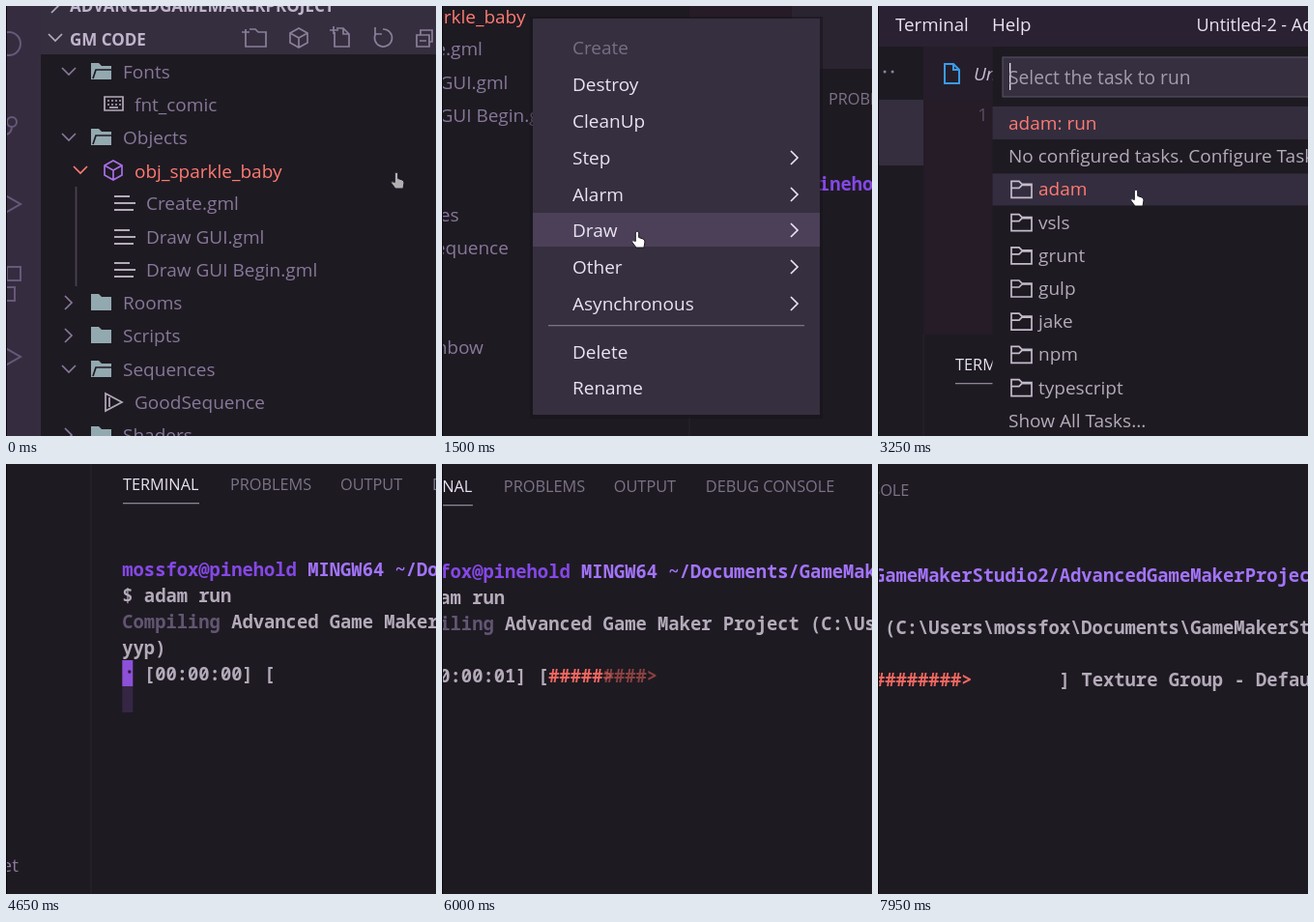
An HTML page for the animation above (8 s loop, 445x445 px).

```html
<!DOCTYPE html>
<html lang="en">
<head>
<meta charset="utf-8">
<title>Editor tour</title>
<style>
  html, body { margin: 0; width: 100%; height: 100%; overflow: hidden; background: #1e1a22; }
  svg { display: block; width: 100vw; height: 100vh; }
  text { font: 19px "Open Sans", "Noto Sans", sans-serif; white-space: pre; }
  .head { font-size: 17px; font-weight: 700; }
  .tab { font-size: 16.3px; }
  .bar { font-size: 18.7px; }
  .title { font-size: 18px; }
  .file { font-style: italic; }
  .mono { font: 600 18.82px "Noto Sans Mono", "DejaVu Sans Mono", monospace; }
  .line { fill: none; stroke-width: 1.7; }
</style>
</head>
<body>
<svg id="stage" viewBox="0 0 445 445"></svg>
<script>
const LOOP = 8000;
const COL = 11.29;
const TERM_X = 487.3;
const TERM_Y = 350.5;
const C = {
  bg: '#1e1a22', raised: '#352e3f', tree: '#87789a', coral: '#ff7b72', folder: '#93a9b0',
  icon: '#8b7f99', dim: '#66597a', pale: '#b4abba', text: '#eae3f2', violet: '#8548e6', lilac: '#a374fa'
};

const rect = (x, y, w, h, fill, extra = '') =>
  `<rect x="${x}" y="${y}" width="${w}" height="${h}" fill="${fill}" ${extra}/>`;
const label = (x, y, s, fill, extra = '') =>
  `<text x="${x}" y="${y + 7}" fill="${fill}" ${extra}>${s}</text>`;
const line = (d, stroke, extra = '') => `<path class="line" d="${d}" stroke="${stroke}" ${extra}/>`;
const mono = (col, row, s, fill, extra = '') =>
  `<text class="mono" x="${TERM_X + col * COL}" y="${TERM_Y + row * 27}" fill="${fill}" ${extra}>${s}</text>`;

const chevron = (x, y, open, color) =>
  line(open ? `M${x - 7} ${y - 4}l7 7 7-7` : `M${x - 4} ${y - 7}l7 7-7 7`, color);
const cube = (x, y, color) =>
  line(`M${x} ${y - 10}l9 5v10l-9 5-9-5v-10zM${x - 9} ${y - 5}l9 5 9-5M${x} ${y}v10`, color);

function folderIcon(y, open) {
  const body = `<path d="M88 ${y - 9}h8l3 3h10v14h-21z" fill="${C.folder}"/>`;
  return body + (open ? line(`M90 ${y + 7}l3-9h17`, C.bg) : '');
}

function folder(y, name, open) {
  return chevron(65, y, open, C.tree) + folderIcon(y, open) + label(121, y, name, C.tree);
}

function script(y, name) {
  return line(`M112 ${y - 7}h16M112 ${y}h22M112 ${y + 7}h20`, C.pale, 'style="stroke-width:2"')
    + label(145, y, name, C.tree);
}

function keyboard(y) {
  return line(`M102 ${y - 8}h19v14h-19z`, C.pale)
    + line(`M105 ${y - 4}h14M105 ${y}h14`, C.pale, 'stroke-dasharray="2 2"')
    + line(`M107 ${y + 3}h9`, C.pale);
}

function headerActions() {
  return '<g id="actions">'
    + line('M252 24h6l3 3h9M248 32v10h21v-15M248 24v8M244 27h8', C.icon) + cube(303, 33, C.icon)
    + line('M340 27v15h15v-13l-6-6h-7M335 25h9M339 21v8M349 23v6h6', C.icon)
    + line('M383 28a9 9 0 1 0 7-4M382 22v7h7', C.icon)
    + line('M425 30h13v12h-13zM429 30v-5h12v12h-3M428 36h7', C.icon) + '</g>';
}

function sidebar() {
  return rect(0, -73, 36, 1000, '#352d3f')
    + `<g class="line" stroke="${C.dim}" style="stroke-width:2">
        <circle cx="3" cy="39" r="12"/><circle cx="6" cy="120" r="5"/>
        <path d="M6 125q0 8-10 9M-6 193L15 205-6 217zM1 270h14v14h-14zM-6 291h15v14h-15zM-6 351L15 363-6 375z"/></g>`
    + '<circle cx="415" cy="-47" r="1.5" fill="#8d8497"/><circle cx="423" cy="-47" r="1.5" fill="#8d8497"/>'
    + rect(36, -18, 419, 68, C.raised)
    + chevron(51, 0, false, C.pale) + label(66, -1, 'ADVANCEDGAMEMAKERPROJECT', '#c0b4cc', 'class="head"')
    + chevron(51, 33, true, C.pale) + label(66, 34, 'GM CODE', '#c0b4cc', 'class="head"')
    + headerActions()
    + folder(68, 'Fonts', true) + keyboard(102) + label(133, 102, 'fnt_comic', C.tree)
    + folder(136, 'Objects', true)
    + chevron(77, 170, true, C.coral) + cube(111, 170, '#a970e8') + label(133, 171, 'obj_sparkle_baby', C.coral)
    + line('M72.5 187V290', '#4a4255')
    + script(204, 'Create.gml') + script(239, 'Draw GUI.gml') + script(273, 'Draw GUI Begin.gml')
    + folder(307, 'Rooms') + folder(341, 'Scripts') + folder(376, 'Sequences', true)
    + line('M103 401l17 9-17 9zM107 405v10', C.pale) + label(133, 410, 'GoodSequence', C.tree)
    + folder(444, 'Shaders') + folder(478, 'Sprites', true) + label(133, 513, 'spr_rainbow', C.tree)
    + folder(547, 'Sounds') + folder(581, 'Paths') + folder(616, 'Tile Sets', true)
    + label(380, 650, 'til_sparkle_rainbow_set', C.tree, 'text-anchor="end"');
}

function editor() {
  return rect(455, -73, 1200, 55, '#251e2a') + rect(455, -18, 1200, 243, '#251c27')
    + rect(561, -18, 1100, 243, '#2a2330')
    + rect(0, -130, 1700, 57, '#2a2232')
    + label(426, -96, 'Terminal', C.text, 'class="bar"') + label(526, -96, 'Help', C.text, 'class="bar"')
    + label(737.5, -96, 'Untitled-2 - AdvancedGameMakerProject', C.text, 'class="title"')
    + line('M477-55h9l6 6v14h-15zM486-55v6h6', '#3b9be8', 'style="stroke-width:2"')
    + label(507, -45, 'Untitled-2', '#c7bcd3', 'class="file"')
    + label(511, -3, '1', '#574d63');
}

function panel() {
  const tabs = [[599, 'PROBLEMS'], [713, 'OUTPUT'], [808, 'DEBUG CONSOLE']];
  const path = 'C:\\Users\\mossfox\\Documents\\GameMakerStudio2\\AdvancedGameMakerProject';
  return line('M455 225V900', '#25202a')
    + label(488, 254.5, 'TERMINAL', C.text, 'class="tab"') + rect(488, 275, 79, 1.3, '#8d8497')
    + tabs.map(([x, s]) => label(x, 254.5, s, '#7d7388', 'class="tab"')).join('')
    + mono(0, 0, 'mossfox@pinehold', C.violet)
    + mono(17, 0, 'MINGW64 ~/Documents/GameMakerStudio2/AdvancedGameMakerProject', C.lilac)
    + mono(0, 1, '$', C.pale) + mono(2, 1, '', C.pale, 'id="command"')
    + '<g id="output">' + mono(0, 2, 'Compiling', '#625572')
    + mono(10, 2, `Advanced Game Maker Project (${path}`, C.pale) + mono(0, 3, 'yyp)', C.pale)
    + rect(TERM_X, 438, 11, 27, '#8d50d8') + rect(TERM_X, 465, 11, 27, '#352744')
    + '<circle id="spinner" r="1.7" fill="#2c1b40"/>'
    + mono(2, 4, '', C.pale, 'id="clock"') + mono(13, 4, '[', C.pale)
    + mono(14, 4, '', '#f2675f', 'id="done"') + mono(14, 4, '', '#f2675f', 'id="leaving"')
    + mono(14, 4, '', '#f2675f', 'id="coming"')
    + mono(54, 4, ']', C.pale) + mono(56, 4, '', C.pale, 'id="message"') + '</g>';
}

const menuItems = [
  ['Create', 203], ['Destroy', 241], ['CleanUp', 279], ['Step', 317, 1], ['Alarm', 355, 1],
  ['Draw', 392, 1], ['Other', 430, 1], ['Asynchronous', 468, 1], ['Delete', 518], ['Rename', 555]
];
function menu() {
  return '<g id="menu">' + rect(290, 171, 303, 416, '#17131b', 'opacity=".5"')
    + rect(293, 173, 297, 410, '#362f3f') + rect(293, 0, 297, 35, '#4b4058', 'id="hover"')
    + menuItems.map(([s, y, sub], i) => label(334, y, s, i ? C.text : '#776f84')
      + (sub ? line(`M560 ${y - 7}l7 7-7 7`, C.text) : '')).join('')
    + rect(309, 490, 265, 1.3, '#7b7287') + '</g>';
}

const tasks = ['adam: run', 'No configured tasks. Configure Tasks...', 'adam', 'vsls', 'grunt', 'gulp',
  'jake', 'npm', 'typescript', 'Show All Tasks...'];
const taskY = i => 6 + i * 34.2;
function palette() {
  const row = (s, i) => {
    const y = taskY(i), plain = i < 2 || i === 9;
    const icon = line(`M546 ${y - 8}h8l3 3h10v14h-21zM546 ${y - 1}h8l3-3h10`, '#c4bbcb');
    return (plain ? '' : icon)
      + label(plain ? 543 : 574, y, s, i ? C.pale : C.coral, 'class="task"');
  };
  return '<g id="palette">' + rect(526.5, -73, 900, 414, C.bg)
    + rect(537, -62, 880, 41, '#352f3f', 'stroke="#5d5468"')
    + rect(544, -56, 1.3, 28, C.text)
    + label(543, -41.5, 'Select the task to run', '#a59cae', 'style="font-size:19.2px"')
    + rect(526.5, -11, 900, 34, '#342d3e') + rect(526.5, 0, 900, 33, '#342d3f', 'id="taskHover"')
    + tasks.map(row).join('') + '</g>';
}

const hand = `<path id="hand" d="M-1.7 0Q0-2 1.7 0V5.5L6 7Q8 7.5 8 10L7 16H-1L-5.5 10Q-4.5 7.5-1.7 9.5Z"
  fill="#fff" stroke="#1b1720" stroke-width="1"/>`;

document.getElementById('stage').innerHTML =
  '<g id="world">' + sidebar() + editor() + panel() + menu() + palette() + hand + '</g>' + rect(0, 0, 1, 445, '#09070b');

const el = Object.fromEntries([...document.querySelectorAll('[id]')].map(n => [n.id, n]));
const taskLabels = [...document.querySelectorAll('.task')];

// Monotone cubic through [time, x, y] keys.
function along(keys, t) {
  let i = 0;
  while (i < keys.length - 2 && t >= keys[i + 1][0]) i++;
  const a = keys[i], b = keys[i + 1], span = b[0] - a[0];
  const u = Math.max(0, Math.min(1, (t - a[0]) / span));
  const rate = (k, n) => (keys[k + 1][n] - keys[k][n]) / (keys[k + 1][0] - keys[k][0]);
  const slope = (k, n) => {
    if (k === 0 || k === keys.length - 1) return 0;
    const p = rate(k - 1, n), q = rate(k, n);
    return p * q <= 0 ? 0 : 2 * p * q / (p + q);
  };
  return [1, 2].map(n => {
    const ease = u * u * (3 - 2 * u);
    return a[n] + (b[n] - a[n]) * ease
      + span * u * (1 - u) * ((1 - u) * slope(i, n) - u * slope(i + 1, n));
  });
}

const camera = [
  [0, 0, 0], [1500, 199, 160], [1900, 203, 160], [2850, 408, -115], [3350, 408, -115], [3351, 366, 235],
  [4300, 366, 235], [4650, 367, 235], [6000, 535, 233], [6950, 745, 231], [7950, 909, 229], [9000, 1000, 228]
];
const pointer = [
  [0, 404, 173], [500, 293, 173], [650, 293, 173], [1500, 401, 394], [1900, 401, 394],
  [2500, 464, -95], [2700, 464, -95], [3250, 675, 76], [3400, 675, 76]
];
const progress = [
  [0, 0], [5400, 2], [5700, 5], [5950, 9], [6150, 12], [6350, 15], [6550, 19], [6800, 24], [7250, 27], [7600, 31]
];

const show = (node, on) => node.setAttribute('visibility', on ? 'visible' : 'hidden');
const barText = n => n ? '#'.repeat(n) + '&gt;' : '';

function drawBar(t) {
  let i = progress.length - 1;
  while (i && t < progress[i][0]) i--;
  const now = progress[i][1], before = i ? progress[i - 1][1] : 0;
  const k = i ? Math.min(1, (t - progress[i][0]) / 100) : 1;
  const place = (node, col, s, alpha) => {
    node.setAttribute('x', TERM_X + (14 + col) * COL);
    node.innerHTML = s;
    node.setAttribute('opacity', alpha);
  };
  place(el.done, 0, '#'.repeat(before), 1);
  place(el.leaving, before, before ? '&gt;' : '', 1 - k);
  place(el.coming, before, barText(now).slice(before), k);
}

function draw(t) {
  const [cx, cy] = along(camera, t);
  const [px, py] = along(pointer, t);
  el.world.setAttribute('transform', `translate(${-cx} ${-cy})`);
  el.hand.setAttribute('transform', `translate(${px} ${py})`);
  el.hand.setAttribute('opacity', Math.min(1, 0.65 + t / 600));
  show(el.hand, t < 3350);
  show(el.actions, px < 455 && py > 0);

  show(el.menu, t >= 550 && t < 2000);
  const item = menuItems.find(([, y], i) => i && Math.abs(py - y) < 19);
  show(el.hover, t >= 550 && t < 2000 && item);
  if (item) el.hover.setAttribute('y', item[1] - 18);

  const open = t >= 2700 && t < 3350;
  show(el.palette, open);
  const over = px > 526 ? tasks.findIndex((_, i) => Math.abs(py - taskY(i)) <= 17.1) : -1;
  show(el.taskHover, open && over >= 0);
  el.taskHover.setAttribute('y', taskY(over) - 16);
  taskLabels.forEach((n, i) => n.setAttribute('fill', i === 0 || i === over ? C.coral : C.pale));

  el.command.textContent = 'adam run'.slice(0, Math.max(0, Math.floor((t - 3450) / 50)));
  show(el.output, t >= 4000);
  el.clock.textContent = `[00:00:0${Math.max(0, Math.floor((t - 4150) / 1000))}]`;
  const step = Math.floor(t / 100) % 6;
  el.spinner.setAttribute('cx', TERM_X + (step < 3 ? 4.5 : 7.5));
  el.spinner.setAttribute('cy', 445 + (step < 3 ? step : 5 - step) * 5);
  el.message.textContent = t < 7150 ? 'Writing' : 'Texture Group - Default';
  drawBar(t);
}

const start = performance.now();
function frame() {
  draw((performance.now() - start) % LOOP);
  requestAnimationFrame(frame);
}
frame();
</script>
</body>
</html>
```
